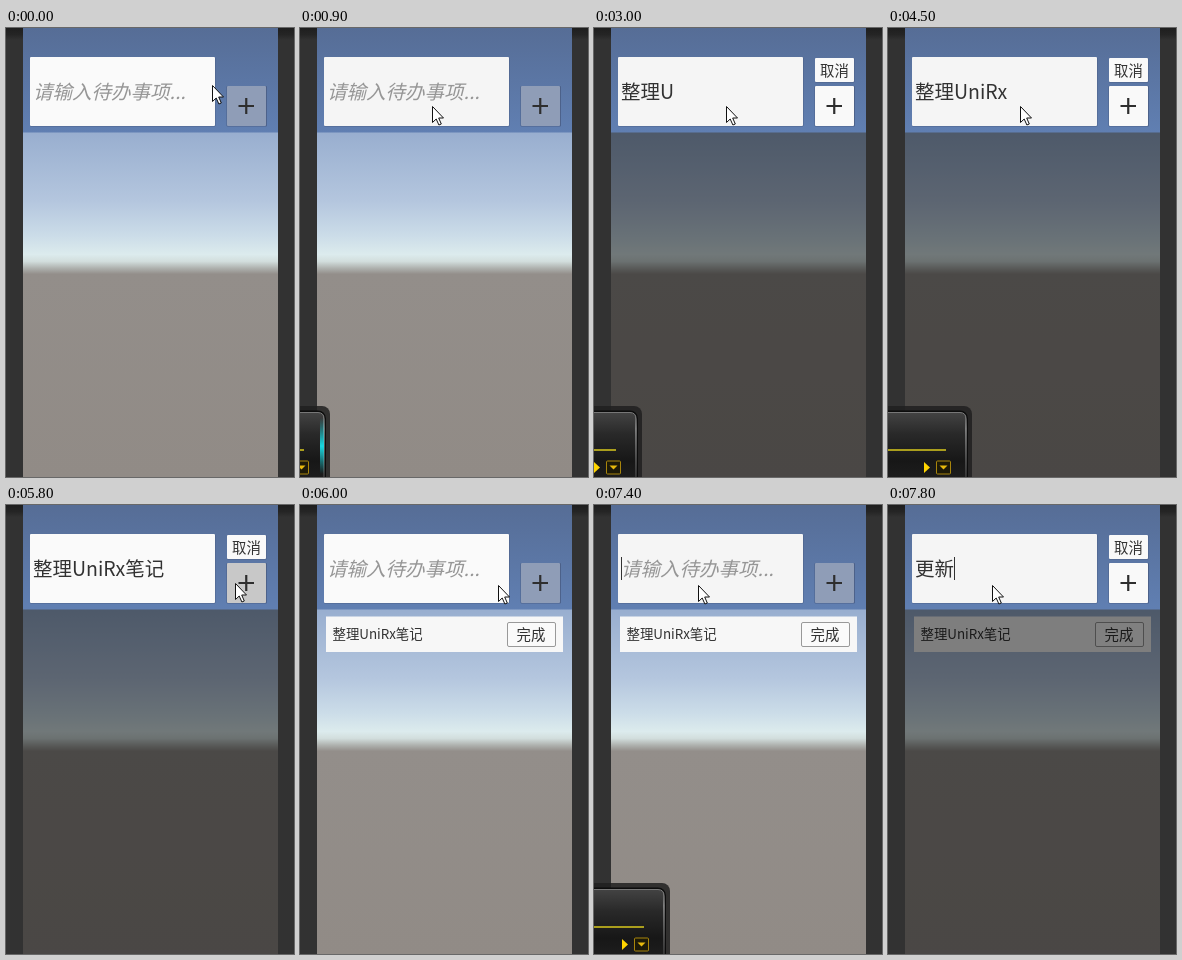
An HTML page that plays this animation: 288 px wide and 449 px high, repeating every 8 s.

```html
<!DOCTYPE html>
<html lang="zh-CN">
<head>
<meta charset="utf-8">
<title>待办事项</title>
<style>
html, body { margin: 0; width: 100%; height: 100%; overflow: hidden; background: #323232; }
svg { display: block; width: 288px; height: 449px; }
text { font-family: "Noto Sans CJK SC", "Noto Sans CJK", "Noto Sans", sans-serif; fill: #323232; }
.big { font-size: 19.5px; }
.mid { font-size: 14.4px; text-anchor: middle; }

/* 8 s loop: 1.25% is one 100 ms step */
.anim { animation: 8s step-end -10ms infinite; }
.cursor { animation-name: cursor; }
.field { animation-name: field; }
.hint { animation-name: hint; }
.busy { animation-name: busy; }
.add { animation-name: add; }
.item { animation-name: item; }
.caret { animation-name: caret; }
.ime { animation-name: ime; }
.glow { animation-name: glow; }
.w1 { animation-name: w1; }
.w2 { animation-name: w2; }
.w3 { animation-name: w3; }
.w4 { animation-name: w4; }
.w5 { animation-name: w5; }

@keyframes cursor {
  0% { transform: translate(206px, 57px); }
  1.25% { transform: translate(193px, 62px); }
  2.5% { transform: translate(163px, 71px); }
  3.75% { transform: translate(140px, 77px); }
  5% { transform: translate(132px, 78px); }
  67.5% { transform: translate(144px, 79px); }
  68.75% { transform: translate(176px, 81px); }
  70% { transform: translate(213px, 80px); }
  71.25%, 73.75% { transform: translate(229px, 78px); }
  75% { transform: translate(198px, 80px); }
  76.25% { transform: translate(135px, 82px); }
  77.5%, 100% { transform: translate(104px, 80px); }
}
@keyframes field {
  0%, 70% { fill: #fafafa; }
  1.25%, 76.25%, 100% { fill: #f5f5f5; }
}
@keyframes hint {
  0%, 73.75% { visibility: visible; }
  20%, 95%, 100% { visibility: hidden; }
}
@keyframes busy {
  0%, 73.75% { visibility: hidden; }
  20%, 95%, 100% { visibility: visible; }
}
@keyframes add {
  0%, 75% { fill: #8f9db7; }
  21.25%, 73.75%, 96.25% { fill: #b3bac8; }
  22.5%, 97.5%, 100% { fill: #f9f9f9; }
  71.25% { fill: #f5f5f5; }
  72.5% { fill: #c8c8c8; }
}
@keyframes item {
  0% { visibility: hidden; }
  73.75%, 100% { visibility: visible; }
}
@keyframes caret {
  0%, 11.25%, 37.5%, 45%, 82.5% { opacity: 0; transform: translateX(27px); }
  5%, 13.75%, 77.5%, 87.5% { opacity: 1; transform: translateX(27px); }
  20%, 95%, 100% { opacity: 1; transform: translateX(66px); }
  28.75%, 42.5% { opacity: 1; transform: translateX(80px); }
}
@keyframes ime {
  0%, 20%, 45%, 60%, 95%, 100% { transform: translateX(-10px); }
  11.25%, 31.25%, 53.75%, 87.5% { transform: translateX(30px); }
  13.75% { transform: translateX(48px); }
  15% { transform: translateX(66px); }
  16.25% { transform: translateX(90px); }
  17.5% { transform: translateX(112px); }
  32.5% { transform: translateX(32px); }
  36.25% { transform: translateX(48px); }
  55% { transform: translateX(57px); }
  56.25% { transform: translateX(84px); }
  57.5% { transform: translateX(109px); }
  88.75% { transform: translateX(66px); }
  90% { transform: translateX(96px); }
  92.5% { transform: translateX(76px); }
}
@keyframes glow {
  0%, 13.75%, 32.5%, 55%, 88.75%, 100% { opacity: 0; }
  11.25%, 31.25%, 53.75%, 87.5% { opacity: 1; }
}
@keyframes w1 {
  0%, 28.75%, 100% { visibility: hidden; }
  20% { visibility: visible; }
}
@keyframes w2 {
  0%, 45%, 100% { visibility: hidden; }
  28.75% { visibility: visible; }
}
@keyframes w3 {
  0%, 60%, 100% { visibility: hidden; }
  45% { visibility: visible; }
}
@keyframes w4 {
  0%, 73.75%, 100% { visibility: hidden; }
  60% { visibility: visible; }
}
@keyframes w5 {
  0% { visibility: hidden; }
  95%, 100% { visibility: visible; }
}
</style>
</head>
<body>
<svg viewBox="0 0 288 449">
  <defs>
    <linearGradient id="side" x2="0" y2="1">
      <stop stop-color="#1e1e1e"/>
      <stop offset=".015" stop-color="#252525"/>
      <stop offset=".027" stop-color="#323232"/>
    </linearGradient>
    <linearGradient id="head" x2="0" y2="1">
      <stop stop-color="#566d96"/>
      <stop offset="1" stop-color="#607fb2"/>
    </linearGradient>
    <linearGradient id="sky" gradientUnits="userSpaceOnUse" x1="0" y1="104" x2="0" y2="449">
      <stop stop-color="#98aecf"/>
      <stop offset=".2" stop-color="#b4c6de"/>
      <stop offset=".3" stop-color="#cbdce8"/>
      <stop offset=".355" stop-color="#dcebed"/>
      <stop offset=".375" stop-color="#d2dedd"/>
      <stop offset=".395" stop-color="#aeb1ae"/>
      <stop offset=".412" stop-color="#938e8a"/>
      <stop offset="1" stop-color="#918b86"/>
    </linearGradient>
    <linearGradient id="shell" x2="0" y2="1">
      <stop stop-color="#444"/>
      <stop offset=".25" stop-color="#292929"/>
      <stop offset=".55" stop-color="#171717"/>
      <stop offset="1" stop-color="#262626"/>
    </linearGradient>
    <linearGradient id="rim" x2="0" y2="1">
      <stop stop-color="#777"/>
      <stop offset=".25" stop-color="#ccc"/>
      <stop offset="1" stop-color="#555"/>
    </linearGradient>
    <linearGradient id="cyan" x2="0" y2="1">
      <stop stop-color="#19d8e0" stop-opacity="0"/>
      <stop offset=".5" stop-color="#19d8e0"/>
      <stop offset="1" stop-color="#19d8e0" stop-opacity="0"/>
    </linearGradient>
  </defs>

  <rect width="288" height="449" fill="url(#side)"/>
  <rect x="17" y="104" width="255" height="345" fill="url(#sky)"/>

  <g class="anim item">
    <rect x="26" y="111.500" width="237" height="35.500" fill="#f7f7f7"/>
    <text x="32.500" y="134" font-size="13.400">整理UniRx笔记</text>
    <rect x="207.500" y="117.500" width="48" height="24" rx="1.500" fill="#fafafa" stroke="#999"/>
    <text class="mid" x="231" y="134.500">完成</text>
  </g>

  <rect class="anim busy" x="17" y="104" width="255" height="345" fill="#000" fill-opacity=".49"/>
  <rect x="17" width="255" height="104.500" fill="url(#head)"/>

  <rect x="24" y="29.500" width="185.500" height="69" rx="1" fill="#46587c" opacity=".7"/>
  <rect class="anim field" x="24" y="29" width="185" height="69" rx="1" fill="#fafafa"/>
  <text class="big anim hint" x="27" y="71" font-style="italic" style="fill:#969696">请输入待办事项...</text>
  <g class="big">
    <text class="anim w1" x="27" y="71">整理</text>
    <text class="anim w2" x="27" y="71">整理U</text>
    <text class="anim w3" x="27" y="71">整理UniRx</text>
    <text class="anim w4" x="27" y="71">整理UniRx笔记</text>
    <text class="anim w5" x="27" y="71">更新</text>
  </g>
  <rect class="anim caret" y="52" width="1" height="23" fill="#323232"/>

  <g class="anim busy">
    <rect x="221" y="30" width="39.500" height="24.500" rx="1" fill="#46587c" opacity=".7"/>
    <rect x="221" y="30" width="39" height="24" rx="1" fill="#f9f9f9"/>
    <text class="mid" x="240.500" y="47.500">取消</text>
  </g>
  <rect x="220.500" y="58" width="40.500" height="40.500" rx="1" fill="#46587c" opacity=".7"/>
  <rect class="anim add" x="221" y="58" width="39" height="40" rx="1" fill="#8f9db7"/>
  <path d="M232.500 78H248M240.250 70V86" stroke="#2e2e2e" stroke-width="2.200"/>

  <!-- Input method panel, drawn leftwards from its right edge -->
  <g class="anim ime">
    <rect x="-200" y="378" width="200" height="90" rx="8" fill="#202020" opacity=".85"/>
    <rect x="-200" y="383.500" width="195" height="90" rx="7" fill="url(#shell)" stroke="#0c0c0c" stroke-width="2"/>
    <path d="M-200 384.500H-12Q-6 384.500 -6 391V449" fill="none" stroke="url(#rim)"/>
    <rect class="anim glow" x="-10" y="390" width="4" height="56" fill="url(#cyan)"/>
    <path d="M-190 422H-26" stroke="#d9c91c" stroke-width="1.500"/>
    <path d="M-48 434L-42 439.500L-48 445Z" fill="#ffd400"/>
    <rect x="-35.500" y="433" width="14" height="13" rx="1" fill="#1d1a08" stroke="#a8850c"/>
    <path d="M-32.500 437.500H-24.500L-28.500 441.500Z" fill="#e8b90c"/>
  </g>

  <path class="anim cursor" d="M.5 .5V16.500L4.200 13L6.900 19L9.300 18L6.700 12H11.500Z" fill="#fff" stroke="#111"/>
</svg>
</body>
</html>
```
